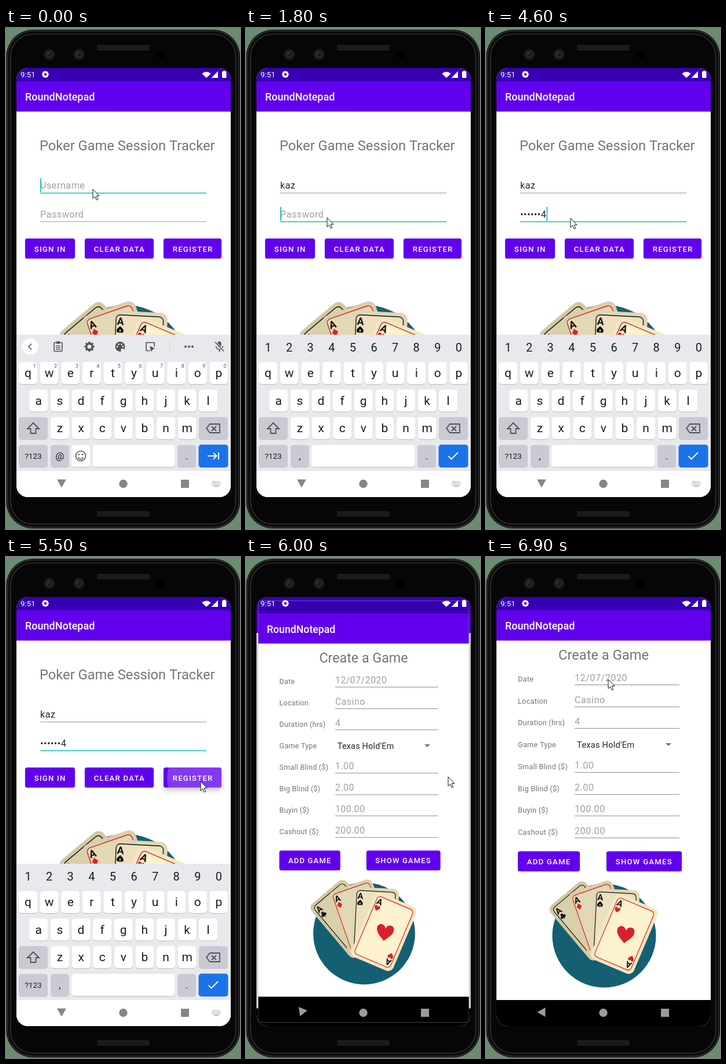
An HTML page with a canvas that plays this animation: 404x864 px, repeating every 7 s.

```html
<!DOCTYPE html>
<html lang="en">
<head>
<meta charset="utf-8">
<title>Session tracker demo</title>
<style>
html, body { margin: 0; width: 100%; height: 100%; overflow: hidden; background: #6b8c70; }
canvas { display: block; width: 404px; height: 864px; }
</style>
</head>
<body>
<canvas id="stage"></canvas>
<script>
const W = 404, H = 864, LOOP = 7000, STEP = 100;
const canvas = document.getElementById('stage');
const dpr = window.devicePixelRatio || 1;
canvas.width = W * dpr;
canvas.height = H * dpr;
const c = canvas.getContext('2d');

const APP = 'RoundNotepad', USER = 'kaz', PASS = USER + '1234';
const PURPLE = '#6200ee', DARK = '#3700b3', TEAL = '#26c9b8', GREY = '#757575';
const HINT = '#a0a0a0', INK = '#262626', ICON = '#4d5056';
const SCREEN = { x: 18, y: 69, w: 370, h: 740, cx: 203, cy: 438.5 };

const USER_KEYS = [200, 500, 800];
const PASS_KEYS = [2000, 2400, 2700, 3600, 3900, 4200, 4600];
const FOCUS = 1400, PRESS = 5400, OPEN = 5860;
const MOUSE = [[0, 150, 278], [900, 150, 278], [1400, 140, 327], [4500, 140, 327],
  [4600, 146, 328], [5300, 336, 387], [5600, 336, 387], [6000, 349, 379],
  [6900, 211, 211], [7000, 211, 211]];

const clamp = v => Math.max(0, Math.min(1, v));
const progress = (t, start, dur) => clamp((t - start) / dur);
const smooth = u => u * u * (3 - 2 * u);

// y at x on a cubic curve given as x0, y0 ... x3, y3
function bezier(x, p) {
  const on = (s, k) => p[k] * (1 - s) ** 3 + 3 * p[k + 2] * s * (1 - s) ** 2 + 3 * p[k + 4] * s * s * (1 - s) + p[k + 6] * s ** 3;
  let lo = 0, hi = 1;
  for (let i = 0; i < 24; i++) {
    const mid = (lo + hi) / 2;
    if (on(mid, 0) < x) lo = mid; else hi = mid;
  }
  return on(lo, 1);
}
// quick start with a long settling tail
const settle = u => u < 1 / 6
  ? bezier(u, [0, 0, 0.05, 0, 0.1333, 0.06, 0.1667, 0.4])
  : bezier(u, [0.1667, 0.4, 0.2083, 0.82, 0.25, 1, 1, 1]);

function rect(x, y, w, h, fill) { c.fillStyle = fill; c.fillRect(x, y, w, h); }
function round(x, y, w, h, r) { c.beginPath(); c.roundRect(x, y, w, h, r); }
function fillRound(x, y, w, h, r, fill) { round(x, y, w, h, r); c.fillStyle = fill; c.fill(); }
function disc(x, y, r, fill) { c.beginPath(); c.arc(x, y, r, 0, 7); c.fillStyle = fill; c.fill(); }
function poly(points, fill) {
  c.beginPath();
  points.forEach(p => c.lineTo(...p));
  c.closePath();
  c.fillStyle = fill;
  c.fill();
}
function line(points, color, width = 1.6) {
  c.beginPath();
  points.forEach(p => c.lineTo(...p));
  c.strokeStyle = color;
  c.lineWidth = width;
  c.stroke();
}
function at(x, y, angle, draw) {
  c.save();
  c.translate(x, y);
  c.rotate(angle);
  draw();
  c.restore();
}
function text(s, x, y, size, color, { weight = 400, gap = 0, align = 'left' } = {}) {
  c.font = `${weight} ${size}px Roboto, sans-serif`;
  c.letterSpacing = gap + 'px';
  c.textAlign = align;
  c.fillStyle = color;
  c.fillText(s, x, y);
  return c.measureText(s).width;
}
const input = (s, x, y, color) => text(s, x, y, 16.2, color, { gap: 0.5 });

function gear(x, y, r, color, width) {
  c.strokeStyle = color;
  c.lineWidth = width;
  c.beginPath(); c.arc(x, y, r * 0.6, 0, 7); c.stroke();
  for (let i = 0; i < 8; i++) {
    const a = i * Math.PI / 4, dx = Math.cos(a), dy = Math.sin(a);
    line([[x + dx * r * 0.65, y + dy * r * 0.65], [x + dx * r, y + dy * r]], color, r * 0.42);
  }
}

// ---- cards ----
function suit(kind, s, fill) {
  c.save();
  c.scale(s, s);
  c.fillStyle = fill;
  c.beginPath();
  if (kind === 'diamond') {
    [[0, -1.1], [0.9, 0], [0, 1.1], [-0.9, 0]].forEach(p => c.lineTo(...p));
  } else if (kind === 'club') {
    [[0, -0.5], [-0.5, 0.25], [0.5, 0.25]].forEach(([x, y]) => { c.moveTo(x, y); c.arc(x, y, 0.48, 0, 7); });
    c.rect(-0.16, 0, 0.32, 1);
  } else {
    if (kind === 'spade') { c.rect(-0.16, 0, 0.32, 1); c.scale(1, -1); }
    c.moveTo(0, 1);
    c.bezierCurveTo(-0.5, 0.5, -1, 0.15, -1, -0.4);
    c.bezierCurveTo(-1, -1, -0.2, -1.1, 0, -0.45);
    c.bezierCurveTo(0.2, -1.1, 1, -1, 1, -0.4);
    c.bezierCurveTo(1, 0.15, 0.5, 0.5, 0, 1);
  }
  c.fill();
  c.restore();
}

function card(x, y, deg, kind, face, edge, full) {
  const red = kind === 'heart' || kind === 'diamond';
  const color = red ? '#d8202c' : '#111';
  at(x, y, deg * Math.PI / 180, () => {
    fillRound(-40, -61, 80, 122, 10, edge);
    fillRound(-34, -55, 68, 110, 6, face);
    c.strokeStyle = color;
    c.lineWidth = 1.2;
    c.stroke();
    const corner = () => {
      text('A', -27.5, -40.5, 15, '#111', { weight: 700, align: 'center' });
      at(-27.5, -34, 0, () => suit(kind, 5, color));
    };
    corner();
    if (full) {
      at(0, 0, Math.PI, corner);
      at(2, 0, -0.25, () => suit(kind, 15, color));
    }
  });
}

function cards() {
  disc(204, 653, 89.5, '#155f73');
  card(175.5, 627.5, -40, 'club', '#d8cfab', '#d2c8a2');
  card(198, 626, -19, 'diamond', '#e2d8b5', '#dacfa9');
  card(222.5, 634, 3, 'spade', '#ebe1be', '#e2d7b1');
  card(238.7, 650.3, 23, 'heart', '#fcf2cd', '#f4e8c0', true);
}

// ---- app pages ----
function page() {
  rect(SCREEN.x, SCREEN.y, SCREEN.w, SCREEN.h, '#fff');
  rect(SCREEN.x, 144, SCREEN.w, 1, '#e4e0ea');
  rect(SCREEN.x, 92, SCREEN.w, 52, PURPLE);
  rect(SCREEN.x, SCREEN.y, SCREEN.w, 23, DARK);
  rect(SCREEN.x, 764, SCREEN.w, 45, '#000');
  text(APP, 33, 125, 18, '#fff', { weight: 500 });
}

function button(x, y, w, pressed = 0) {
  c.save();
  c.shadowColor = 'rgba(0,0,0,0.22)';
  c.shadowBlur = 2 + pressed * 8;
  c.shadowOffsetY = 1 + pressed * 4;
  fillRound(x, y, w, 34.5, 3.6, PURPLE);
  c.restore();
}
const caption = (s, x, y) => text(s, x + 15.7, y + 22.5, 13.2, '#fff', { weight: 500, gap: 1.22 });

function ripple(t) {
  const fade = 1 - progress(t, 5600, 250);
  if (t < PRESS || !fade) return;
  c.save();
  round(272, 363, 100, 34.5, 3.6);
  c.clip();
  disc(336, 381, 12 + 46 * (t - PRESS) / 100, `rgba(255,255,255,${0.22 * fade})`);
  c.restore();
}

function field(value, hint, y, focused, cursorOn) {
  const w = value ? input(value, 59, y, INK) : 0;
  if (!value) input(hint, 59, y, HINT);
  if (focused) rect(59, y + 6.8, 287, 1.7, TEAL);
  else rect(59, y + 7, 287, 1, '#999');
  if (focused && cursorOn) rect(59 + w, y - 18, 2, 24, TEAL);
}

function login(t) {
  page();
  text('Poker Game Session Tracker', 58, 210.5, 23.7, GREY);
  const onPass = t >= FOCUS;
  const keys = [...USER_KEYS, FOCUS, ...PASS_KEYS].filter(k => k <= t);
  const cursorOn = (t - (keys.pop() || 0)) % 1000 < 500;
  const n = PASS_KEYS.filter(k => k <= t).length;
  const user = USER.slice(0, USER_KEYS.filter(k => k <= t).length);
  const pass = n ? '•'.repeat(n - 1) + PASS[n - 1] : '';
  field(user, 'Username', 277, !onPass, cursorOn);
  field(pass, 'Password', 326.5, onPass, cursorOn);
  button(33, 363, 86);
  button(136, 363, 119);
  button(272, 363, 100, t >= PRESS ? 1 - progress(t, 5600, 250) : 0);
  ripple(t);
  caption('SIGN IN', 33, 363);
  caption('CLEAR DATA', 136, 363);
  caption('REGISTER', 272, 363);
  c.save();
  c.translate(196, 506);
  c.scale(1.2, 1.2);
  c.translate(-196, -587);
  cards();
  c.restore();
}

const FORM = [['Date', '12/07/2020'], ['Location', 'Casino'], ['Duration (hrs)', '4'],
  ['Game Type', ''], ['Small Blind ($)', '1.00'], ['Big Blind ($)', '2.00'],
  ['Buyin ($)', '100.00'], ['Cashout ($)', '200.00']];

function game() {
  page();
  text('Create a Game', SCREEN.cx, 177, 23.7, GREY, { align: 'center' });
  FORM.forEach(([label, value], i) => {
    const y = 215 + i * 37.7;
    text(label, 55, y, 12.8, GREY, { gap: 0.22 });
    if (!value) return;
    input(value, 153, y - 1, HINT);
    rect(153, Math.round(y + 5), 181, 1, '#8c8c8c');
  });
  text("Texas Hold'Em", 157, 329, 14.7, INK, { gap: 0.2 });
  poly([[310, 321], [320, 321], [315, 326]], '#757575');
  button(55, 507.5, 107);
  button(208, 507.5, 130);
  caption('ADD GAME', 55, 507.5);
  caption('SHOW GAMES', 208, 507.5);
  cards();
}

// ---- keyboard ----
function key(x, y, w, fill, label, size = 21) {
  fillRound(x, y + 1.2, w, 38, 5, '#c3c4cb');
  fillRound(x, y, w, 38, 5, fill);
  if (label) text(label, x + w / 2, y + 19 + size * 0.34, size, '#1b1b1f', { align: 'center' });
}

function toolbar() {
  const y = 549.5;
  disc(42, y, 14, '#fff');
  line([[44, y - 5], [39, y], [44, y + 5]], ICON);
  c.strokeStyle = ICON;
  c.lineWidth = 1.6;
  round(83, y - 7, 14, 15, 1.5); c.stroke();
  rect(87, y - 9, 6, 4, ICON);
  [-2, 1, 4].forEach(d => rect(86, y + d, 8, 1.3, ICON));
  gear(144, y, 8.5, ICON, 3);
  disc(197, y, 8.5, ICON);
  [[-5, 0], [-2.5, -4], [2.5, -4], [5, 0]].forEach(([dx, dy]) => disc(197 + dx, y + dy, 1.4, '#e8e8ed'));
  disc(201, y + 6, 2.8, '#e8e8ed');
  line([[249, y + 7], [242, y + 7], [242, y - 7], [256, y - 7], [256, y]], ICON);
  poly([[248, y - 1], [257, y + 3], [253, y + 5], [251, y + 9]], ICON);
  rect(282, y - 9, 1, 18, '#cfd0d5');
  [-6, 0, 6].forEach(d => disc(316 + d, y, 1.9, ICON));
  fillRound(365.5, y - 9, 6, 11, 3, ICON);
  c.strokeStyle = ICON;
  c.lineWidth = 1.5;
  c.beginPath(); c.arc(368.5, y - 1, 6, 0, Math.PI); c.stroke();
  rect(367.7, y + 5, 1.6, 4, ICON);
  line([[361, y - 8], [376, y + 8]], '#e8e8ed', 3.5);
  line([[361, y - 8], [376, y + 8]], ICON, 1.5);
}

function keyboard(secure) {
  const func = '#cacad3', pitch = 36.6;
  rect(SCREEN.x, 529, SCREEN.w, 280, '#e8e8ed');
  if (!secure) toolbar();
  [...'qwertyuiop'].forEach((k, i) => {
    const x = 22 + i * pitch, digit = String((i + 1) % 10);
    key(x, 576, 32, '#fff', k);
    if (secure) text(digit, x + 16, 558, 20, '#1b1b1f', { align: 'center' });
    else text(digit, x + 29.5, 586, 9, '#55565c', { align: 'right' });
  });
  [...'asdfghjkl'].forEach((k, i) => key(40.3 + i * pitch, 623.5, 32, '#fff', k));
  key(22, 671, 50, func);
  [...'zxcvbnm'].forEach((k, i) => key(77 + i * pitch, 671, 32, '#fff', k));
  key(333, 671, 50, func);

  c.strokeStyle = ICON;
  c.lineWidth = 1.8;
  c.beginPath();
  [[47, 681], [57, 691], [51.5, 691], [51.5, 699], [42.5, 699], [42.5, 691], [37, 691]].forEach(p => c.lineTo(...p));
  c.closePath(); c.stroke();
  c.beginPath();
  [[346, 690.5], [352, 683], [369, 683], [369, 698], [352, 698]].forEach(p => c.lineTo(...p));
  c.closePath(); c.stroke();
  line([[355, 687], [363, 695]], ICON, 1.8);
  line([[363, 687], [355, 695]], ICON, 1.8);

  key(22, 719, 50, func, '?123', 13.5);
  key(77, 719, 32, func, secure ? ',' : '@', 17);
  key(296, 719, 32, func, '.', 17);
  fillRound(332.5, 718.5, 51, 39.5, 5, '#1a73e8');
  if (secure) {
    key(113, 719, 178.5, '#fff');
    line([[349.5, 738.5], [354.5, 743.5], [366, 732]], '#fff', 1.9);
  } else {
    key(113, 719, 32, '#fff');
    key(149.5, 719, 142, '#fff');
    c.strokeStyle = ICON;
    c.lineWidth = 1.6;
    c.beginPath(); c.arc(129, 738, 8.5, 0, 7); c.stroke();
    c.beginPath(); c.arc(129, 739, 4.5, 0.2, 2.94); c.stroke();
    disc(126, 735.5, 1.3, ICON);
    disc(132, 735.5, 1.3, ICON);
    line([[348, 738], [363, 738]], '#fff', 2);
    line([[358, 732.5], [363.5, 738], [358, 743.5]], '#fff', 2);
    line([[367, 732], [367, 744]], '#fff', 2);
  }
}

// ---- system layer ----
function statusIcons() {
  text('9:51', 25, 85, 13.3, '#fff');
  gear(68, 80, 6, '#fff', 2.8);
  c.beginPath();
  c.moveTo(346, 86);
  c.arc(346, 86, 10.5, -Math.PI * 0.76, -Math.PI * 0.24);
  c.fillStyle = '#fff';
  c.fill();
  poly([[366, 74.5], [366, 86], [354.5, 86]], '#fff');
  fillRound(373, 75, 7.5, 11, 1, '#fff');
  rect(375, 73.8, 3.5, 2, '#fff');
}

function navIcons(t, ime) {
  const color = ime ? '#858585' : '#9b9b9b';
  const turn = smooth(progress(t, 5930, 220));
  at(96, 785, turn * Math.PI / 2, () => poly([[-8, -6.5], [8, -6.5], [0, 7.5]], color));
  disc(202.5, 786, 7.2, color);
  rect(302, 779, 14, 14, color);
  if (!ime) return;
  for (let i = 0; i < 6; i++) for (let j = 0; j < 3; j++) rect(355.5 + i * 2.6, 781.5 + j * 2.8, 1.5, 1.6, '#a0a0a0');
  rect(359, 789.6, 8, 1.4, '#a0a0a0');
}

function grille(y) {
  rect(157, y, 91, 10, '#161616');
  for (let j = 0; j < 3; j++) for (let i = 0; i < 30; i++) {
    rect(158 + i * 3 + (j % 2) * 1.5, y + 1 + j * 3, 1.5, 1.5, '#2b2b2b');
  }
}

function body() {
  rect(0, 0, W, H, '#6b8c70');
  fillRound(0.5, 3, 403.5, 860, 46, '#0b0b0b');
  [[2, '#303030', 1.5], [7.5, '#3c3c3c', 1.2]].forEach(([d, color, w]) => {
    round(0.5 + d, 3 + d, 403.5 - 2 * d, 860 - 2 * d, 46 - d);
    c.strokeStyle = color;
    c.lineWidth = w;
    c.stroke();
  });
  fillRound(9, 11.5, 386.5, 843, 37, '#060606');
  grille(29);
  grille(833);
  [75, 126].forEach(x => {
    disc(x, 45.5, 9.5, '#1b1b1b');
    disc(x, 45.5, 6, '#292929');
    disc(x, 45.5, 3.5, '#171717');
    disc(x - 2, 44, 1.2, '#555');
  });
  disc(267, 46, 6.5, '#000');
}

function scaled(s, draw) {
  c.save();
  c.translate(SCREEN.cx, SCREEN.cy);
  c.scale(s, s);
  c.translate(-SCREEN.cx, -SCREEN.cy);
  draw();
  c.restore();
}

function pointer(t) {
  const i = MOUSE.findIndex(m => m[0] > t);
  const [t0, x0, y0] = MOUSE[i - 1], [t1, x1, y1] = MOUSE[i];
  const u = smooth((t - t0) / (t1 - t0));
  at(x0 + (x1 - x0) * u, y0 + (y1 - y0) * u, 0, () => {
    const shape = [[0, 0], [0, 16], [3.6, 12.6], [6.2, 18.6], [8.7, 17.5], [6.2, 11.7], [11, 11.5]];
    poly(shape, '#fff');
    line([...shape, shape[0]], '#111', 1);
  });
}

function draw(t) {
  c.setTransform(dpr, 0, 0, dpr, 0, 0);
  body();
  c.save();
  round(SCREEN.x, SCREEN.y, SCREEN.w, SCREEN.h, 20);
  c.clip();

  const u = progress(t, OPEN, 400);
  const p = u && settle(u);
  if (u < 1) scaled(1 + 0.05 * p, () => login(t));
  if (u > 0 && u < 1) {
    rect(SCREEN.x, SCREEN.y, SCREEN.w, SCREEN.h, `rgba(0,0,0,${0.2 * p})`);
    rect(SCREEN.x, SCREEN.y, SCREEN.w, 23, DARK);
  }
  if (u > 0) {
    c.globalAlpha = progress(t, OPEN + 35, 50);
    scaled(0.85 + 0.15 * p, game);
    c.globalAlpha = 1;
  }

  // the keyboard sinks a little while it fades
  const hide = progress(t, OPEN - 20, 140), ime = hide < 1;
  if (ime) {
    c.globalAlpha = 1 - hide;
    c.save();
    c.translate(0, 28 * hide);
    keyboard(t >= FOCUS + 100);
    c.restore();
    rect(SCREEN.x, 764, SCREEN.w, 45, '#fff');
    c.globalAlpha = 1;
  }
  statusIcons();
  navIcons(t, ime);
  c.restore();
  pointer(t);
}

const start = performance.now();
function frame(now) {
  const t = Math.max(0, now - start) % LOOP;
  draw(Math.floor(t / STEP) * STEP);
  requestAnimationFrame(frame);
}
draw(0);
requestAnimationFrame(frame);
</script>
</body>
</html>
```
